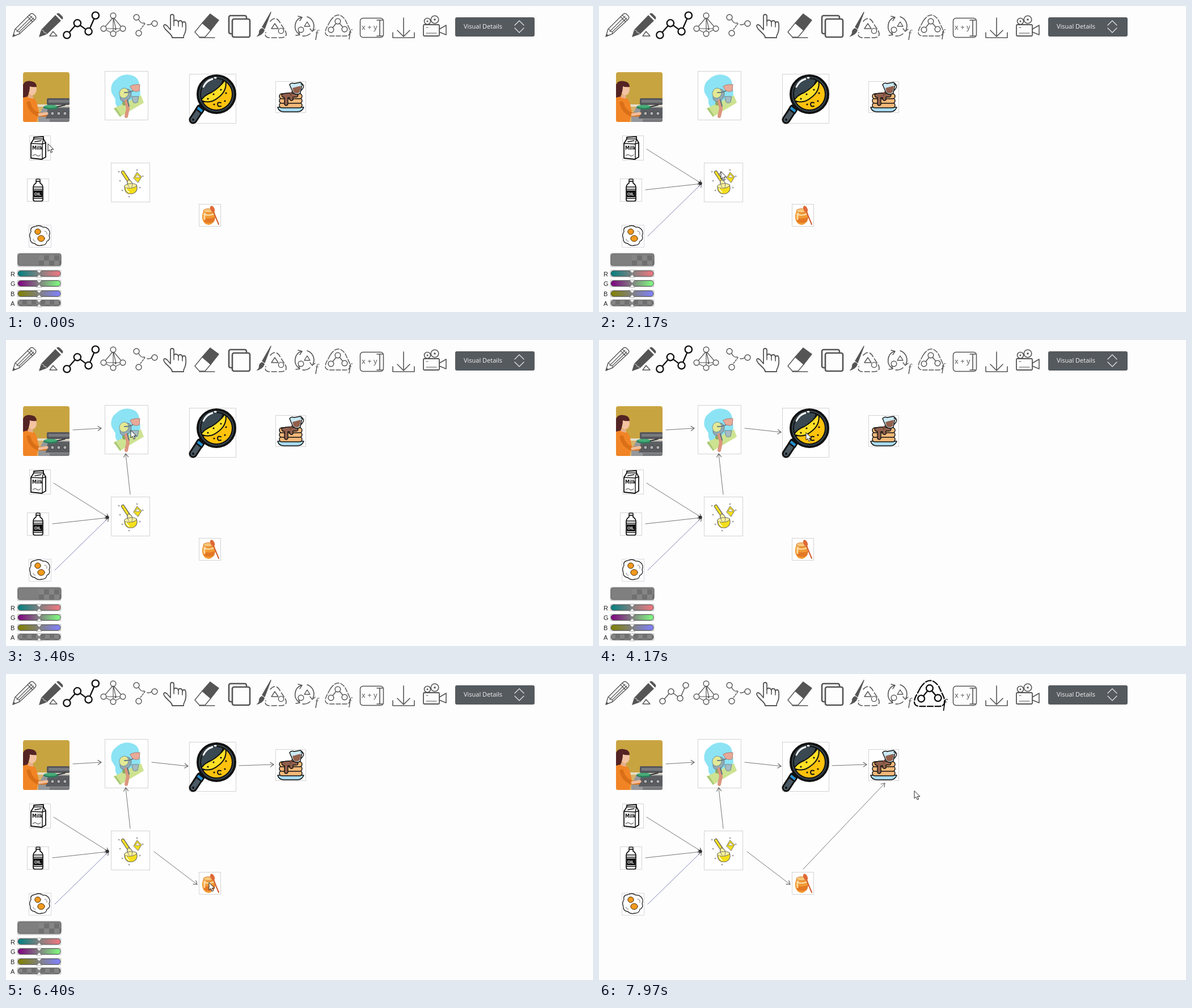
These frames come from a looping animation (1035 px wide and 541 px high, 8000 ms). An HTML page with a canvas:

```html
<!DOCTYPE html>
<html lang="en">
<head>
<meta charset="utf-8">
<title>Recipe diagram</title>
<style>
html, body { margin: 0; width: 100%; height: 100%; overflow: hidden; background: #fdfdfd; }
canvas { display: block; }
</style>
</head>
<body>
<canvas id="stage" width="1035" height="541"></canvas>
<script>
const ctx = document.getElementById('stage').getContext('2d');
const LOOP = 8000, SWITCH = 7620;
const INK = '#555', BLACK = '#111';

// Drawing helpers
function path(d, fill, stroke, width = 1.4) {
  const p = new Path2D(d);
  if (fill) { ctx.fillStyle = fill; ctx.fill(p); }
  if (stroke) { ctx.strokeStyle = stroke; ctx.lineWidth = width; ctx.stroke(p); }
}
function oval(x, y, rx, ry, fill, stroke, width = 1.4, turn = 0) {
  ctx.beginPath();
  ctx.ellipse(x, y, rx, ry, turn, 0, Math.PI * 2);
  if (fill) { ctx.fillStyle = fill; ctx.fill(); }
  if (stroke) { ctx.strokeStyle = stroke; ctx.lineWidth = width; ctx.stroke(); }
}
const disc = (x, y, r, fill, stroke, width) => oval(x, y, r, r, fill, stroke, width);
function box(x, y, w, h, r, fill, stroke, width = 1.4) {
  ctx.beginPath();
  ctx.roundRect(x, y, w, h, r);
  if (fill) { ctx.fillStyle = fill; ctx.fill(); }
  if (stroke) { ctx.strokeStyle = stroke; ctx.lineWidth = width; ctx.stroke(); }
}
function text(s, x, y, font, color) {
  ctx.font = font;
  ctx.fillStyle = color;
  ctx.fillText(s, x, y);
}
function dashed(pattern, draw) {
  ctx.setLineDash(pattern);
  draw();
  ctx.setLineDash([]);
}
function card(x, y, w, h, color = '#c4c4c4') {
  box(x + .5, y + .5, w, h, 0, '#fff');
  dashed([2, 1], () => box(x + .5, y + .5, w, h, 0, null, color, .8));
}
function scaled(x, y, on, draw) {
  ctx.save();
  if (on) {
    ctx.translate(x, y);
    ctx.scale(1.23, 1.23);
    ctx.translate(-x, -y);
  }
  draw(on ? BLACK : INK, on ? 1.9 : 1.5);
  ctx.restore();
}
const rings = (list, r, color, width) => list.forEach(([x, y]) => disc(x, y, r, '#fdfdfd', color, width));

// Toolbar
function pencils() {
  path('M12 54L16 41L42 15Q45 12 48 14L52 18Q54 21 51 24L24 49Z', '#fff', INK);
  path('M16 41Q20 41 19 45Q24 44 24 49M20 44L46 18M23 46L49 21M38 19L47 28M41 16L50 25', null, INK, 1.1);
  path('M12 54L13.5 49L17 52Z', INK);
  path('M58 55L62 42L87 16L97 26L72 50ZM89 14Q92 11 95 14L99 18Q102 21 99 24Z', INK);
  path('M63 43Q67 42 67 47Q72 46 71 50', null, '#ddd', 1);
  path('M83 45L77 53H90Z', '#fdfdfd', INK);
}
function nodes(on) {
  scaled(132, 34, on, (c, w) => {
    path('M112 48L127 31L143 43L153 20', null, c, w);
    rings([[112, 48], [127, 31], [143, 43], [153, 20]], 5, c, w);
  });
}
function graphs() {
  path('M189 20L172 40L189 49L206 40ZM189 20V49M172 40H206M189 20L194 41', null, INK, 1.2);
  rings([[189, 17], [172, 40], [206, 40], [189, 49]], 4.8, INK);
  disc(193, 41, 1.5, INK);
  path('M234 24Q238 32 244 30M249 33Q254 34 257 31', null, INK);
  dashed([3, 2], () => path('M245 31L236 43', null, INK));
  rings([[230, 20], [262, 31], [234, 48]], 5, INK);
}
function handAndEraser() {
  path('M290 42L284 35Q279 31 278 35Q278 37 281 41L290 50Q293 53 293 56H313Q313 52 315 49Q318 42 317 33Q317 28 314 28Q311 28 311 31Q311 26 307 26Q304 26 304 29Q303 25 299 25Q297 25 296 27V18Q296 15 293 15Q290 15 290 18Z', '#fff', INK, 1.8);
  path('M296 27V35M304 29V36M311 31V37', null, INK, 1.6);
  path('M346 30L333 46L341 55H351L361 43Z', '#fff', INK);
  path('M346 30L360 14L375 25L361 43Z', INK, INK);
  path('M341 56H368', null, INK);
}
function squares() {
  box(393, 17, 31, 32, 3, '#fdfdfd', INK, 2.6);
  box(399, 23, 31, 32, 3, '#fdfdfd', INK, 2.6);
}
function brush() {
  path('M467 11L452 37L456 40Z', INK, INK, 1.5);
  path('M451 39Q455 40 456 43Q453 52 441 54Q447 50 446 45Q447 41 451 39Z', INK);
  dashed([9, 4], () => path('M466 27Q474 18 481 26L493 45Q497 55 486 56H464Q455 55 458 47', null, INK, 1.6));
  path('M474 31L468 40H480Z', null, INK);
  disc(485, 44, 4.6, null, INK);
}
function cycle() {
  path('M517 50A17 17 0 0 1 521 20M531 19A17 17 0 0 1 541 43M536 49A17 17 0 0 1 523 53', null, INK, 1.6);
  path('M515 18L522 20L518 26M511 52L518 51L516 45M545 41L540 45L536 40', null, INK);
  path('M531 28L526 36H536Z', null, INK);
  disc(520, 42, 4.8, null, INK);
  text('f', 545, 56, 'italic 19px "Liberation Serif", serif', INK);
}
function group(on) {
  scaled(594, 35, on, (c, w) => {
    dashed([8, 3], () => path('M572 26Q585 7 598 24L605 39Q610 53 598 53H572Q559 53 565 39Z', null, c, w));
    path('M585 27L573 42M585 27L597 41', null, c, w);
    rings([[585, 27], [573, 42], [597, 41]], 4.8, c, w);
    text('f', 604, 55, 'italic 18px "Liberation Serif", serif', c);
  });
}
function lastTools() {
  box(624.5, 21.5, 41, 34, 5, '#fdfdfd', INK, 1.5);
  text('x + y', 627, 42, '13px "Open Sans", sans-serif', INK);
  path('M654 25H664M659 25V53M654 53H664', null, INK, 1.6);
  path('M701 21V54M690 43L701 54L712 43M682 47V56H720V47', null, INK, 1.6);
  disc(743, 27, 5.5, '#fdfdfd', INK, 1.6);
  disc(756, 24, 6.8, '#fdfdfd', INK, 1.6);
  disc(743, 27, 1.5, INK);
  disc(756, 24, 1.8, INK);
  path('M764 41L776 34V51L764 46Z', '#fdfdfd', INK, 1.6);
  box(736, 33, 28, 20, 2, '#fdfdfd', INK, 1.8);
  path('M741 38H744M741 48H759', null, INK, 1.2);
  box(792, 20, 140, 34, 3, '#555a5e');
  text('Visual Details', 807, 40, '11px "Open Sans", sans-serif', '#f4f4f4');
  path('M897 34L905 26L913 34M897 39L905 47L913 39', null, '#e2e2e2', 1.3);
}

// Ingredient pictures
function stove() {
  ctx.save();
  ctx.beginPath();
  ctx.roundRect(30, 117, 82, 88, 4);
  ctx.clip();
  box(30, 117, 82, 88, 0, '#c8a441');
  box(30, 174, 82, 31, 0, '#d7b36a');
  box(54, 174, 58, 4, 0, '#e6dccb');
  box(72, 163, 40, 12, 2, '#55565a');
  box(75, 166, 37, 5, 0, '#77797d');
  path('M66 178H112V205H57V196Z', '#96989b');
  path('M74 180H112V199H70Z', '#5b5d61');
  [82, 93, 104].forEach(x => disc(x, 190, 3.3, '#aeb0b3', '#333', 1));
  box(77, 200, 35, 5, 0, '#77797d');
  oval(79, 179, 13, 4, '#2b7f5c');
  oval(79, 177.5, 11, 2.7, '#46ad78');
  path('M91 178L104 175', null, '#333', 2);
  path('M30 158L44 160Q53 163 55 174L58 188L54 205H30Z', '#f18425');
  path('M39 157H47L48 164L39 162Z', '#e8ae8b');
  oval(46, 147, 8, 11, '#f3c3a2');
  path('M30 139Q34 131 44 133Q54 134 54 143Q46 144 42 142Q42 151 38 160L30 162Z', '#542425');
  path('M40 172Q44 188 58 192L69 192', null, '#d96f16', 7);
  path('M59 192L72 190', null, '#f0bd9a', 5);
  ctx.restore();
}
function batter() {
  card(174, 115, 76, 86);
  path('M186 153Q183 137 195 129Q205 119 220 122Q236 126 235 143Q240 158 232 168Q218 178 203 184Q191 177 193 165Z', '#8ce3f4');
  path('M190 181L238 158L243 171L201 196Z', '#cde391');
  path('M190 181L201 196L203 194L194 180Z', '#a9c977');
  path('M222 160H234L232 170Q227 173 224 170Z', '#a5bcc3', '#6e858d', 1);
  disc(209, 172, 4, '#8da861');
  oval(211, 158, 9, 12, '#91aab3', '#677d86', 1, .6);
  oval(208, 154, 8, 9, '#e3e994', '#78919a', 1, .4);
  path('M209 153Q220 154 232 145', null, '#647a82', 2);
  path('M219 142Q225 138 236 139L235 150Q228 153 223 149Z', '#e8aa98', '#a16b62', .8);
  path('M212 168L215 181L212 195', null, '#dc967f', 6);
  path('M214 166L217 177', null, '#5c747c', 2);
}
function pan() {
  card(323, 120, 82, 87);
  path('M330 201L343 181', null, BLACK, 15);
  path('M330 201L342 183', null, '#4b5963', 9);
  disc(330, 201, 2, BLACK);
  path('M339 176L349 184L345 190L335 182Z', '#2590cf', BLACK, 2.5);
  disc(371, 156, 33, '#394851', BLACK, 4);
  ctx.save();
  ctx.beginPath();
  ctx.arc(371, 156, 28, 0, Math.PI * 2);
  ctx.clip();
  path('M340 172Q373 164 385 126H410V195H345Z', '#ffc20d', BLACK, 2.5);
  path('M343 168Q350 157 362 153Q376 145 387 130Q391 150 374 162Q361 173 347 168Z', '#ffe026', BLACK, 2);
  ctx.restore();
  disc(371, 156, 28, null, BLACK, 2);
  path('M348 143Q353 132 364 129', null, '#fff', 3);
  path('M368 127H370', null, '#fff', 3);
  [[356, 164], [366, 156], [379, 148], [388, 154], [367, 174], [386, 168]].forEach(([x, y]) => disc(x, y, 1.6, BLACK));
  path('M379 171Q373 169 373 174Q374 179 379 177', null, BLACK, 2);
}
function pancakes() {
  card(475, 133, 53, 55);
  path('M479 179H525Q522 187 514 187H490Q481 187 479 179Z', '#a9dcf4', BLACK, 1.5);
  [171, 163, 155].forEach(y => box(482, y, 40, 9, 4.5, '#f2b879', BLACK, 1.5));
  path('M486 156Q501 151 515 157Q515 162 510 161H506V166Q503 169 500 165V162H497V174Q494 178 491 174V162Q485 161 486 156Z', '#92604c', BLACK, 1.4);
  path('M505 152Q501 154 502 157', null, '#75493a', 3);
  path('M500 139Q503 135 508 137L519 135Q525 137 521 143L519 154Q512 159 506 153Z', '#c9e9f5', BLACK, 1.4);
  path('M505 145L520 141L518 152Q512 157 507 152Z', '#92604c');
  path('M520 138Q529 139 521 149', null, BLACK, 1.4);
}
function milk() {
  card(41, 229, 37, 43);
  path('M44 243L49 235V232L66 231V235L70 242V267L63 271L44 269Z', '#fff', BLACK, 1.8);
  path('M49 235L66 235M44 243L64 244L70 242M64 244V271M64 244L66 235M51 240L62 238', null, BLACK, 1.4);
  text('Milk', 46, 254, 'bold 8px "DejaVu Sans", sans-serif', BLACK);
  path('M47 265Q51 261 54 264T61 263', null, BLACK, .9);
}
function oil() {
  card(37, 305, 38, 40);
  box(53, 306, 7, 4, 1, '#fff', BLACK, 1.5);
  path('M53 310H60V313Q65 316 65 321V342Q65 345 62 345H51Q48 345 48 342V321Q48 316 53 313Z', '#fff', BLACK, 1.7);
  path('M48 320H65M48 324H65M48 340H65', null, BLACK, 1.3);
  box(49, 326, 15, 12, 0, BLACK);
  text('OIL', 50, 335, 'bold 7px "Liberation Sans", sans-serif', '#fff');
}
function eggs() {
  card(40, 387, 39, 39, '#c9c9d6');
  path('M44 399Q42 391 51 390Q59 386 65 391Q70 390 74 394Q79 399 76 406Q79 413 72 416Q71 423 63 423Q55 425 51 420Q42 419 43 411Q40 405 44 399Z', '#fff', '#222', 1.3);
  oval(56, 399, 5.2, 5, '#f19a1d', '#4a3010', 1);
  oval(62, 411, 6.2, 5.3, '#f19a1d', '#4a3010', 1);
  path('M68 398Q73 398 72 404M48 412Q48 416 52 416', null, '#555', .8);
}
function mix() {
  card(185, 277, 68, 69);
  path('M206 294L218 312', null, '#555', 6);
  path('M206 294L217 311', null, '#f5df27', 4);
  oval(219, 315, 4, 8, '#fff6a3', '#666', 1, -.5);
  path('M209 318Q220 324 230 316Q234 328 223 332H216Q208 328 209 318Z', '#f4df1b', '#666', 1.1);
  oval(219.5, 318, 11, 4, '#fff39b', '#666', 1, -.1);
  path('M217 306Q210 311 217 320M218 308Q225 311 222 320', null, '#777', 1);
  path('M212 322Q213 327 217 329', null, '#fff', 1.4);
  path('M225 304L231 294L239 302L233 312Z', '#f4df1b', '#666', 1);
  path('M228 303L232 298L236 303Z', '#fff', '#777', .8);
  [[199, 293], [231, 290], [241, 301], [201, 309], [205, 326], [236, 321], [217, 337]].forEach(([x, y]) => disc(x, y, 1, null, '#777', .8));
}
function honey() {
  card(340, 350, 38, 39);
  path('M349 361Q357 358 366 361Q372 372 366 382Q358 391 350 384Q342 374 349 361Z', '#f29a35');
  path('M348 374Q358 378 369 373L367 381Q358 386 349 381Z', '#e47825');
  path('M351 366Q349 371 350 377', null, '#ffd596', 3);
  oval(357, 362, 9, 3.5, '#f8c878', '#d9772d', 1);
  path('M349 368Q358 372 368 367', null, '#fbe0ae', 2);
  path('M363 357L375 386', null, '#cf5d2e', 2);
  oval(364, 359, 3.5, 6, '#de6936', null, 1, -.45);
}

// Colour panel
function checks(x, y, w, h, size) {
  for (let j = 0; j * size < h; j++)
    for (let i = 0; i * size < w; i++) {
      ctx.fillStyle = (i + j) % 2 ? '#707070' : '#858585';
      ctx.fillRect(x + i * size, y + j * size, Math.min(size, w - i * size), Math.min(size, h - j * size));
    }
}
function slider(label, y, from, to) {
  text(label, 8, y + 4.5, '11px "Liberation Sans", sans-serif', '#222');
  box(19.5, y - 6.5, 78, 13, 2, '#d3d3d3');
  ctx.save();
  ctx.beginPath();
  ctx.roundRect(21, y - 5, 75, 10, 5);
  ctx.clip();
  if (from) {
    const g = ctx.createLinearGradient(21, 0, 96, 0);
    g.addColorStop(0, from);
    g.addColorStop(.5, '#808080');
    g.addColorStop(1, to);
    ctx.fillStyle = g;
    ctx.fillRect(21, y - 5, 75, 10);
  } else checks(21, y - 5, 75, 10, 8);
  ctx.restore();
  box(21, y - 5, 75, 10, 5, null, '#555', 1);
  path(`M54 ${y - 6}H63L58.5 ${y - 1}ZM54 ${y + 7}H63L58.5 ${y + 2}Z`, '#f3f3f3', '#999', .6);
}
function palette() {
  box(19.5, 436.5, 78, 25, 3, '#d3d3d3');
  ctx.save();
  ctx.beginPath();
  ctx.roundRect(21, 438, 76, 21, 4);
  ctx.clip();
  box(21, 438, 76, 21, 0, '#7f7f7f');
  checks(58, 441, 39, 18, 9);
  ctx.restore();
  box(21, 438, 76, 21, 4, null, '#626262', 1.2);
  slider('R', 473, '#008080', '#f47680');
  slider('G', 490.5, '#800080', '#80ff80');
  slider('B', 508.5, '#808000', '#8080ff');
  slider('A', 525);
}

// Pointer route: time, x, y
const ROUTE = [
  [30, 74, 244], [340, 181, 314], [390, 181, 314], [700, 65, 324], [760, 65, 324],
  [980, 181, 314], [1100, 181, 314], [1600, 62, 405], [1830, 62, 405], [2000, 215, 293],
  [2170, 215, 293], [2480, 210, 152], [2560, 210, 152], [2930, 88, 158], [3070, 88, 158],
  [3370, 220, 160], [3440, 220, 160], [3800, 349, 163], [3900, 349, 163], [4170, 365, 164],
  [5350, 365, 164], [5530, 398, 166], [5830, 491, 172], [5900, 491, 172], [6130, 220, 312],
  [6170, 220, 312], [6390, 358, 369], [6730, 358, 369], [7130, 504, 166], [7530, 504, 166],
  [7620, 587, 40]
];
function pointer(t) {
  const n = ROUTE.findIndex(k => k[0] > t);
  if (n === 0) return ROUTE[0].slice(1);
  if (n < 0) return ROUTE[ROUTE.length - 1].slice(1);
  const [t0, x0, y0] = ROUTE[n - 1], [t1, x1, y1] = ROUTE[n];
  const u = (t - t0) / (t1 - t0), e = u * u * (3 - 2 * u);
  return [x0 + (x1 - x0) * e, y0 + (y1 - y0) * e];
}

// Links: drag start, release, settled line, colour
const LINKS = [
  [30, 360, [84, 253], [181, 314]],
  [760, 1030, [82, 325], [181, 314]],
  [1830, 2000, [86, 407], [181, 314], '#8585bb'],
  [2170, 2500, [219, 273], [211, 201]],
  [3070, 3390, [118, 159], [168, 156]],
  [3440, 3870, [257, 156], [321, 163]],
  [5350, 5860, [411, 162], [472, 160]],
  [6170, 6400, [261, 314], [337, 372]],
  [6730, 7170, [360, 345], [504, 193]]
];
function arrow([x0, y0], [x1, y1], color = '#777') {
  path(`M${x0} ${y0}L${x1} ${y1}`, null, color, 1);
  const a = Math.atan2(y1 - y0, x1 - x0);
  const arm = d => `${x1 - 7 * Math.cos(a + d)} ${y1 - 7 * Math.sin(a + d)}`;
  path(`M${arm(.6)}L${x1} ${y1}L${arm(-.6)}`, null, '#666', 1.2);
}
function links(t) {
  for (const [start, end, a, b, color] of LINKS) {
    if (t >= end) arrow(a, b, color);
    else if (t > start) arrow(pointer(start), pointer(t));
  }
  if (t >= 2000) disc(178.5, 313.5, 3, '#333');
}
function cursor(t) {
  if (t >= 7680 && t < 7970) return;
  ctx.save();
  ctx.translate(...(t >= 7970 ? [556, 207] : pointer(t)));
  path('M0 0V13L3 10.2L5.3 15.2L7.6 14.2L5.4 9.4H9.4Z', '#fff', '#222', 1);
  ctx.restore();
}

function frame(now) {
  const t = now % LOOP, grouped = t >= SWITCH;
  ctx.lineJoin = ctx.lineCap = 'round';
  ctx.fillStyle = '#fdfdfd';
  ctx.fillRect(0, 0, 1035, 541);
  pencils();
  nodes(!grouped);
  graphs();
  handAndEraser();
  squares();
  brush();
  cycle();
  group(grouped);
  lastTools();
  [stove, batter, pan, pancakes, milk, oil, eggs, mix, honey].forEach(draw => draw());
  if (!grouped) palette();
  links(t);
  cursor(t);
  requestAnimationFrame(frame);
}
requestAnimationFrame(frame);
</script>
</body>
</html>
```
